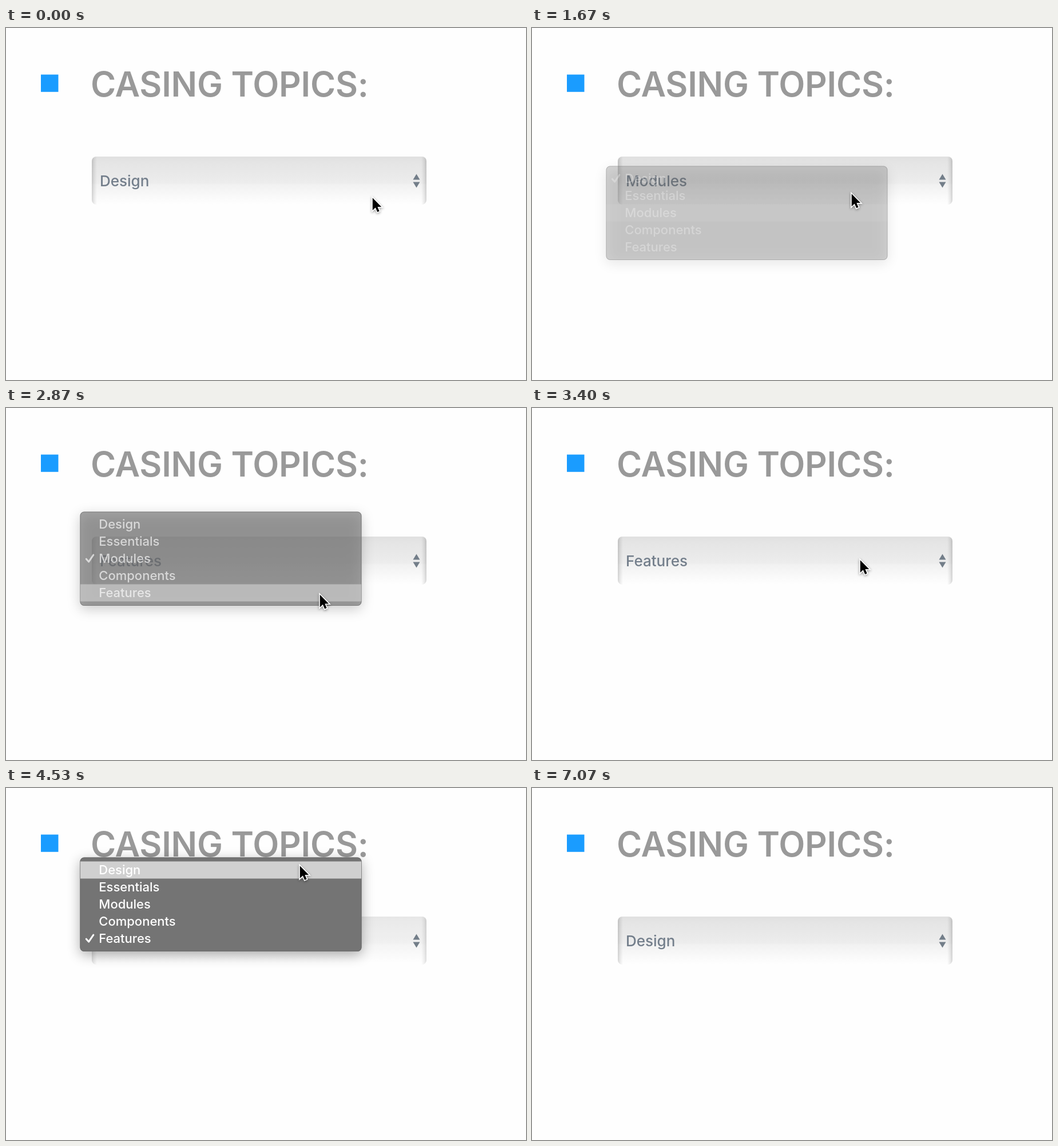
These frames come from a looping animation (909x616 px, 7590 ms). An HTML page with a canvas:

```html
<!DOCTYPE html>
<html lang="en">
<head>
<meta charset="utf-8">
<title>Casing topics</title>
<style>
  html, body { margin: 0; width: 100%; height: 100%; overflow: hidden; background: #fefefe; }
  canvas { display: block; width: 909px; height: 616px; }
</style>
</head>
<body>
<canvas id="stage"></canvas>
<script>
const W = 909, H = 616, LOOP = 7590, STEP = 200 / 3;
const FONT = 'Inter, Roboto, sans-serif';
const ITEMS = ['Design', 'Essentials', 'Modules', 'Components', 'Features'];
const MENU = { x: 129.5, w: 492, h: 164.5, pad: 7, row: 30 };
const BOX = { x: 150, y: 225, w: 585, h: 84 };

// Each session: the menu opens, an item is clicked, the menu fades away.
const SESSIONS = [
  { open: 330, click: 1400, from: 0, to: 2 },
  { open: 1870, click: 2670, from: 2, to: 4 },
  { open: 3670, click: 4600, from: 4, to: 0 }
];
const BLINK = 65, FADE_AT = 130, FADE = 200;

// Pointer path: time, x, y of the tip.
const PATH = [
  [0, 640, 296], [130, 645, 298], [330, 645, 298], [730, 592, 346],
  [930, 561, 353], [1070, 556, 336], [1200, 554, 322], [1470, 554, 322],
  [1800, 560, 272], [2070, 556, 270], [2130, 554, 288], [2200, 553, 304],
  [2400, 547, 328], [2800, 547, 328], [3400, 573, 265], [3530, 573, 265],
  [3670, 577, 299], [4130, 528, 190], [4270, 528, 190], [4530, 513, 135],
  [4670, 513, 135], [5000, 582, 310], [5400, 582, 310], [5470, 757, 340]
];
const POINTER_GONE = 5530;
const ARROW = [[0, 0], [0, 16.4], [3.8, 12.8], [6.3, 18.6], [8.9, 17.5], [6.5, 11.8], [11.6, 11.8]];

const canvas = document.getElementById('stage');
const ctx = canvas.getContext('2d');
const dpr = window.devicePixelRatio || 1;
canvas.width = W * dpr;
canvas.height = H * dpr;

const clamp = v => Math.max(0, Math.min(1, v));
const ease = u => u * u * (3 - 2 * u);

function pointerAt(t) {
  const next = PATH.findIndex(p => p[0] > t);
  if (next < 0) return PATH[PATH.length - 1].slice(1);
  if (next === 0) return PATH[0].slice(1);
  const a = PATH[next - 1], b = PATH[next];
  const u = ease((t - a[0]) / (b[0] - a[0]));
  return [a[1] + (b[1] - a[1]) * u, a[2] + (b[2] - a[2]) * u];
}

function gradient(x0, y0, x1, y1, stops) {
  const g = ctx.createLinearGradient(x0, y0, x1, y1);
  stops.forEach(([at, color]) => g.addColorStop(at, color));
  return g;
}

function rounded(x, y, w, h, r) {
  ctx.beginPath();
  ctx.roundRect(x, y, w, h, r);
}

function polygon(points) {
  ctx.beginPath();
  points.forEach(([x, y]) => ctx.lineTo(x, y));
  ctx.closePath();
}

function text(str, x, y, size, weight, color, spacing = 0) {
  ctx.font = `${weight} ${size}px ${FONT}`;
  ctx.letterSpacing = spacing + 'px';
  ctx.fillStyle = color;
  ctx.fillText(str, x, y);
}

function drawSelect(label, pressed) {
  const { x, y, w, h } = BOX;
  ctx.save();
  rounded(x, y, w, h, 8);
  ctx.clip();
  ctx.fillStyle = gradient(0, y, 0, y + h, [
    [0, '#e0e0e0'], [0.1, '#e4e4e4'], [0.56, '#ededed'],
    [0.58, '#f1f1f1'], [0.85, '#fafafa'], [1, '#fefefe']
  ]);
  ctx.fillRect(x, y, w, h);
  for (const [edge, dir] of [[x, 1], [x + w, -1]]) {
    ctx.fillStyle = gradient(edge, 0, edge + dir * 9, 0, [
      [0, 'rgba(0,0,0,.16)'], [0.45, 'rgba(0,0,0,.07)'], [1, 'rgba(0,0,0,0)']
    ]);
    ctx.fillRect(Math.min(edge, edge + dir * 9), y, 9, h);
  }
  if (pressed) {
    ctx.fillStyle = 'rgba(255,255,255,.2)';
    ctx.fillRect(x, y, w, h);
  }
  ctx.restore();

  text(label, 164, 277, 26, 450, '#737e8b');
  ctx.fillStyle = '#737e89';
  polygon([[711.5, 265.5], [717.5, 255.5], [723.5, 265.5]]);
  ctx.fill();
  polygon([[711.5, 269.5], [717.5, 279.5], [723.5, 269.5]]);
  ctx.fill();
}

function drawMenu(checked, active, alpha) {
  const { x, w, h, pad, row } = MENU;
  const y = 241.5 - row * checked;
  ctx.save();
  ctx.globalAlpha = alpha;

  ctx.save();
  ctx.shadowColor = 'rgba(0,0,0,.32)';
  ctx.shadowBlur = 22 * dpr;
  ctx.shadowOffsetY = 6 * dpr;
  rounded(x, y, w, h, 7);
  ctx.fillStyle = '#747474';
  ctx.fill();
  ctx.restore();

  rounded(x + 0.5, y + 0.5, w - 1, h - 1, 6.5);
  ctx.strokeStyle = '#696969';
  ctx.lineWidth = 1;
  ctx.stroke();

  if (active >= 0) {
    ctx.fillStyle = '#d0d0d0';
    ctx.fillRect(x + 0.5, y + pad + active * row, w - 1, row);
  }
  ITEMS.forEach((item, i) => text(item, 162.3, y + 29.5 + i * row, 22, 450, '#fff'));

  const cy = y + checked * row;
  ctx.beginPath();
  ctx.moveTo(140.3, cy + 22.7);
  ctx.lineTo(144.6, cy + 27.6);
  ctx.lineTo(152.8, cy + 15.6);
  ctx.strokeStyle = '#fff';
  ctx.lineWidth = 3;
  ctx.lineCap = ctx.lineJoin = 'round';
  ctx.stroke();
  ctx.restore();
}

function drawPointer([x, y]) {
  ctx.save();
  ctx.translate(x + 0.8, y + 1.2);
  ctx.scale(1.33, 1.33);
  polygon(ARROW);
  ctx.save();
  ctx.shadowColor = 'rgba(0,0,0,.4)';
  ctx.shadowBlur = 4 * dpr;
  ctx.shadowOffsetY = 1.5 * dpr;
  ctx.strokeStyle = '#fff';
  ctx.lineWidth = 2.4;
  ctx.lineJoin = 'miter';
  ctx.miterLimit = 3;
  ctx.stroke();
  ctx.restore();
  ctx.fillStyle = '#000';
  ctx.fill();
  ctx.restore();
}

// The highlight trails the pointer by one step.
function hoveredRow(t, checked) {
  const [px, py] = pointerAt(t - STEP);
  if (px > MENU.x + MENU.w) return -1;
  const i = Math.floor((py - 241.5 + MENU.row * checked - MENU.pad) / MENU.row);
  return i < ITEMS.length ? i : -1;
}

function draw(t) {
  ctx.setTransform(dpr, 0, 0, dpr, 0, 0);
  ctx.fillStyle = '#fefefe';
  ctx.fillRect(0, 0, W, H);
  ctx.fillStyle = '#1a9cff';
  ctx.fillRect(61, 81.5, 30.5, 30.3);
  text('CASING TOPICS:', 148, 119.5, 60, 600, '#999', -0.2);

  const session = SESSIONS.find(s => t >= s.open && t < s.click + FADE_AT + FADE);
  const done = SESSIONS.filter(s => t >= s.click + FADE_AT).pop();
  drawSelect(ITEMS[done ? done.to : 0], session && t < session.click + FADE_AT);

  if (session) {
    const since = t - session.click;
    const active = since < 0 ? hoveredRow(t, session.from) : since < BLINK ? -1 : session.to;
    drawMenu(session.from, active, 1 - clamp((since - FADE_AT) / FADE));
  }
  if (t < POINTER_GONE) drawPointer(pointerAt(t));
}

const start = performance.now();
function tick() {
  const t = (performance.now() - start) % LOOP;
  const snapped = Math.floor((t + 4) / STEP) * STEP;
  draw(Math.round(snapped / 10) * 10);
  requestAnimationFrame(tick);
}
tick();
</script>
</body>
</html>
```
